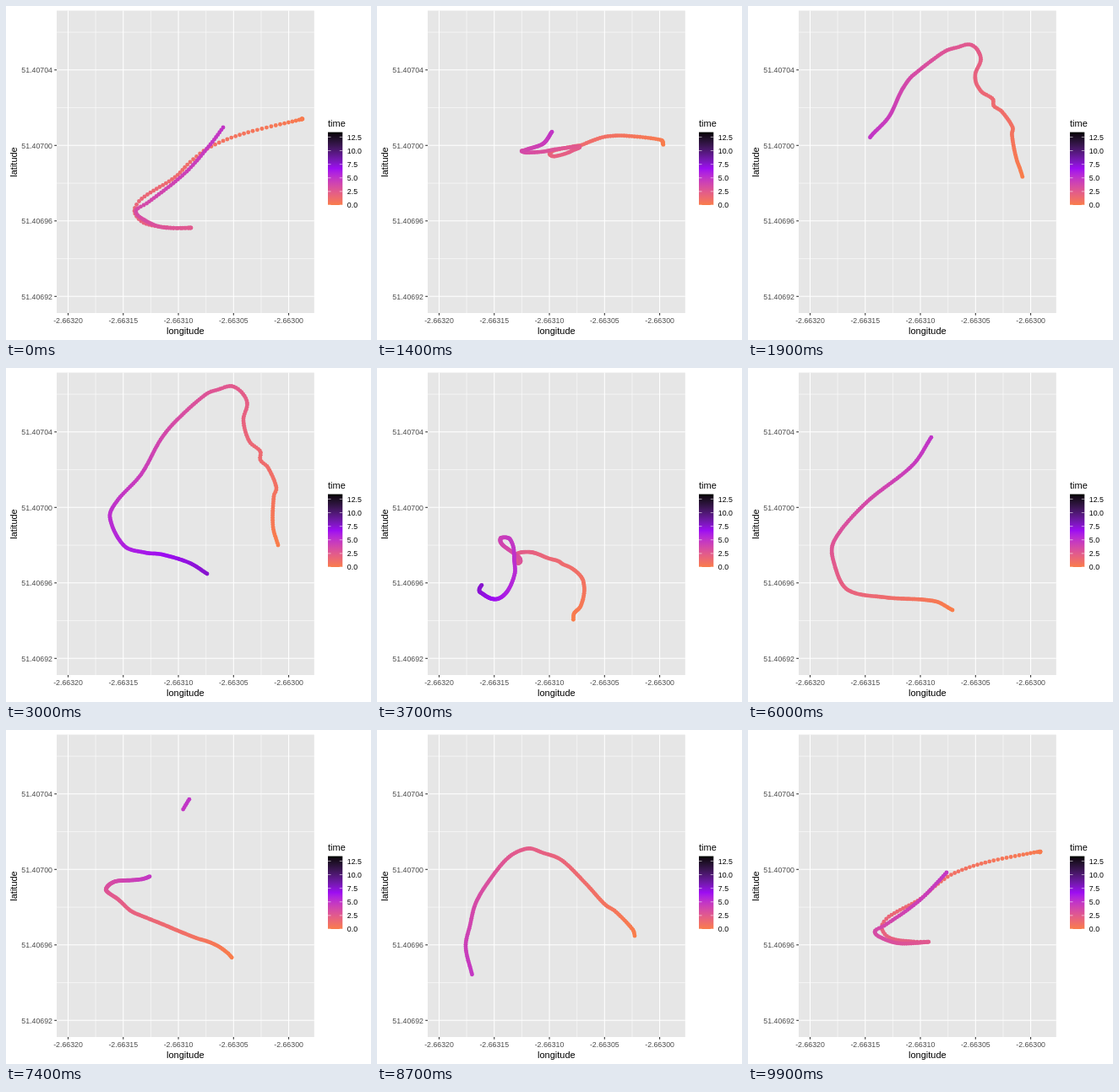
Recreate the animation shown at these times as an HTML page. Size 432 px wide and 396 px high, loop 10 s.

```html
<!DOCTYPE html>
<html lang="en">
<head>
<meta charset="utf-8">
<title>Tracks over time</title>
<style>
  html, body { margin: 0; width: 100%; height: 100%; overflow: hidden; background: #fff; }
  svg { display: block; }
  text { font-family: "Liberation Sans", Arial, sans-serif; font-size: 11px; }
  .label { font-size: 8.8px; fill: #4d4d4d; }
  .key { font-size: 8.8px; }
</style>
</head>
<body>
<svg id="stage" width="432" height="396" viewBox="0 0 432 396"></svg>
<script>
const FRAME = 100, HOLD = 10, CYCLE = 20;   // ms per step, steps held, steps per track
const RATE = 30, MAX_TIME = 13.4;           // samples per second, top of the colour scale
const PANEL = { x: 60, y: 5.5, w: 304.8, h: 358.5 };

// A leg is a duration followed by x, y knots, travelled at an even speed
function makeTrack(x, y, ...legs) {
  const knots = [[0, x, y]];
  for (const [duration, ...coords] of legs) {
    const [t0, ...origin] = knots.at(-1);
    const lengths = [];
    let length = 0, [px, py] = origin;
    for (let i = 0; i < coords.length; i += 2) {
      length += Math.hypot(coords[i] - px, coords[i + 1] - py);
      [px, py] = [coords[i], coords[i + 1]];
      lengths.push(length);
    }
    lengths.forEach((s, i) =>
      knots.push([t0 + duration * s / length, coords[2 * i], coords[2 * i + 1]]));
  }
  return sampleCurve(knots);
}

// Cubic Hermite curve through the knots, sampled at a steady rate
function sampleCurve(knots) {
  const last = knots.length - 1;
  const slope = (i, axis) => {
    const a = knots[Math.max(0, i - 1)], b = knots[Math.min(last, i + 1)];
    return (b[axis] - a[axis]) / (b[0] - a[0]);
  };
  const points = [];
  for (let n = 0, k = 0; n / RATE <= knots[last][0] + 1e-9; n++) {
    const t = n / RATE;
    while (k < last - 1 && t > knots[k + 1][0]) k++;
    const span = knots[k + 1][0] - knots[k][0], u = (t - knots[k][0]) / span;
    points.push([1, 2].map(axis =>
      (1 + 2 * u) * (1 - u) ** 2 * knots[k][axis] + u * u * (3 - 2 * u) * knots[k + 1][axis] +
      span * u * (1 - u) * ((1 - u) * slope(k, axis) - u * slope(k + 1, axis))));
  }
  return points;
}

const hook = makeTrack(350, 134,
  [.2, 347, 135],
  [.9, 279, 152, 240, 168, 218, 185],
  [.7, 200, 203, 160, 229, 152, 243],
  [.7, 163, 257, 195, 263, 219, 263],
  [1.06, 183, 262, 158, 250, 154, 242],
  [1.34, 168, 233, 212, 198, 242, 164, 257, 144]);

const arch = makeTrack(322, 210,
  [4.9, 316, 188, 317, 152, 320, 142, 310, 118, 301, 109, 301, 99, 288, 87, 281, 62,
   285.5, 42, 279, 29, 267, 21.5, 253, 25, 237, 31, 201, 63, 183, 85, 160, 126, 132, 157],
  [2.7, 123, 177, 140, 211, 165, 219, 184, 221, 217, 231, 238, 244]);

const loops = makeTrack(194, 336,
  [13.4, 196, 330, 209, 325, 215, 308, 209, 295, 195, 287.5, 170, 284.5, 145, 287,
   121, 303, 131, 319, 141, 315, 145, 303, 134, 268, 133, 253, 139, 238, 162, 228,
   174, 236, 179, 250, 179, 268, 158, 289, 120, 297, 78, 279, 74, 269, 80, 254,
   113, 236.5, 130, 240, 160, 270, 171, 290, 172, 305, 163, 318, 145, 325, 131, 322,
   119, 298, 128, 285, 146, 279, 165, 284, 190, 313, 203.5, 348]);

const bend = makeTrack(242, 287,
  [2.9, 221, 276.5, 163, 272, 118, 263, 102.5, 233.7, 101.5, 206],
  [2.07, 138.7, 160.8, 195, 115, 217, 82]);

const hill = makeTrack(305, 244,
  [4.77, 303, 237, 282, 215, 270, 207, 247, 182, 218, 154, 196, 145.5, 179, 140.5,
   157, 150, 134, 177, 117, 205, 110, 232, 105, 257, 112.5, 290]);

const tracks = [hook, arch, loops, bend, hill];

function colourAt(time) {
  const u = Math.min(2, 2 * time / MAX_TIME);
  const [from, to] = u < 1 ? ["#f97d4a", "#9d0cf2"] : ["#9d0cf2", "#000"];
  return `color-mix(in lab, ${to} ${((u < 1 ? u : u - 1) * 100).toFixed(2)}%, ${from})`;
}

const stage = document.getElementById("stage");
function add(tag, attrs, text, parent = stage) {
  const node = document.createElementNS("http://www.w3.org/2000/svg", tag);
  for (const name in attrs) node.setAttribute(name, attrs[name]);
  if (text) node.textContent = text;
  return parent.appendChild(node);
}
const line = (x1, y1, x2, y2, stroke, width) =>
  add("line", { x1, y1, x2, y2, stroke, "stroke-width": width });

function drawAxes() {
  const right = PANEL.x + PANEL.w, bottom = PANEL.y + PANEL.h;
  const gridX = i => 73.5 + 65.27 * i, gridY = i => 75.8 + 89.5 * i;
  const vertical = (x, width) => line(x, PANEL.y, x, bottom, "#fff", width);
  const horizontal = (y, width) => line(PANEL.x, y, right, y, "#fff", width);
  add("rect", { x: PANEL.x, y: PANEL.y, width: PANEL.w, height: PANEL.h, fill: "#e6e6e6" });
  for (let i = 0; i < 4; i++) {
    vertical(gridX(i + .5), .55);
    horizontal(gridY(i - .5), .55);
  }
  ["-2.66320", "-2.66315", "-2.66310", "-2.66305", "-2.66300"].forEach((label, i) => {
    const x = gridX(i);
    vertical(x, 1.07);
    line(x, bottom, x, bottom + 2.75, "#333", 1.07);
    add("text", { x, y: 375.7, class: "label", "text-anchor": "middle" }, label);
  });
  ["51.40704", "51.40700", "51.40696", "51.40692"].forEach((label, i) => {
    const y = gridY(i);
    horizontal(y, 1.07);
    line(PANEL.x - 2.75, y, PANEL.x, y, "#333", 1.07);
    add("text", { x: 55, y: y + 3.2, class: "label", "text-anchor": "end" }, label);
  });
  add("text", { x: 212.4, y: 388.6, "text-anchor": "middle" }, "longitude");
  add("text", { transform: "translate(13.4 185) rotate(-90)", "text-anchor": "middle" }, "latitude");
}

function drawLegend() {
  const left = 381, width = 17.3, top = 149.6, height = 86.4, stops = 40;
  const gradient = add("linearGradient", { id: "scale", x1: 0, y1: 1, x2: 0, y2: 0 });
  for (let i = 0; i <= stops; i++) {
    const stop = add("stop", { offset: i / stops }, "", gradient);
    stop.style.stopColor = colourAt(MAX_TIME * i / stops);
  }
  add("text", { x: left, y: 143 }, "time");
  add("rect", { x: left, y: top, width, height, fill: "url(#scale)" });
  for (let time = 0; time <= 12.5; time += 2.5) {
    const y = top + height * (1 - time / MAX_TIME);
    line(left, y, left + 3.5, y, "#fff", .55);
    line(left + width - 3.5, y, left + width, y, "#fff", .55);
    add("text", { x: 403.8, y: y + 3.2, class: "key" }, time.toFixed(1));
  }
}

drawAxes();
drawLegend();
const longest = Math.max(...tracks.map(track => track.length));
const dots = Array.from({ length: longest }, (_, i) => {
  const dot = add("circle", { r: 2.45 });
  dot.style.fill = colourAt(i / RATE);
  return dot;
});

// Shared samples glide; surplus ones stay put until the next track is reached
function render(step) {
  const index = Math.floor(step / CYCLE);
  const mix = Math.max(0, step % CYCLE - HOLD) / (CYCLE - HOLD);
  const from = tracks[index], to = tracks[(index + 1) % tracks.length];
  dots.forEach((dot, i) => {
    const a = from[i];
    dot.style.display = a ? "" : "none";
    if (!a) return;
    const b = to[i] || a;
    dot.setAttribute("cx", (a[0] + (b[0] - a[0]) * mix).toFixed(2));
    dot.setAttribute("cy", (a[1] + (b[1] - a[1]) * mix).toFixed(2));
  });
}

const start = performance.now();
let shown = -1;
function tick() {
  const elapsed = Math.max(0, performance.now() - start);
  const step = Math.floor(elapsed / FRAME) % (CYCLE * tracks.length);
  if (step !== shown) render(shown = step);
  requestAnimationFrame(tick);
}
tick();
</script>
</body>
</html>
```
